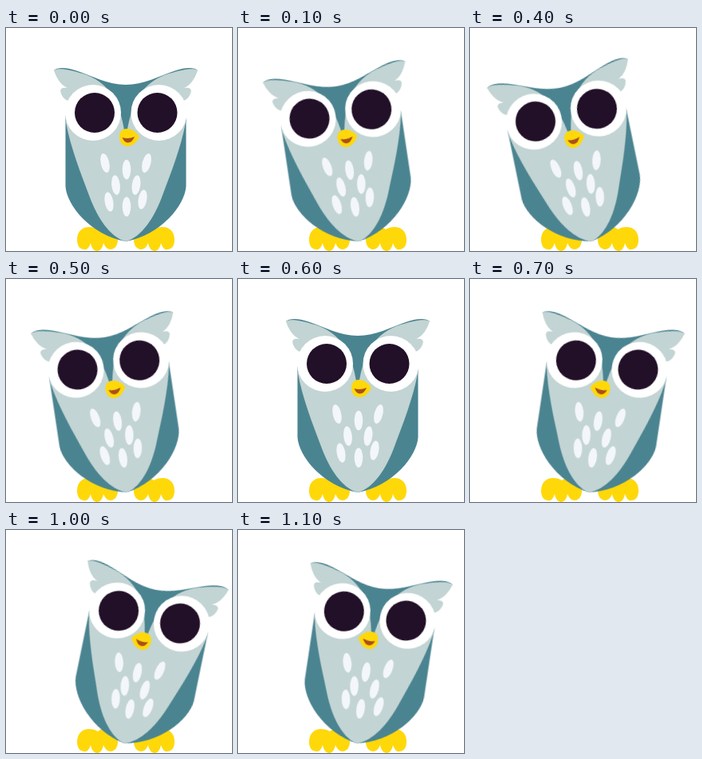
An HTML page without scripts for the animation above (1200 ms loop, 283 px wide and 279 px high).

```html
<!DOCTYPE html>
<html lang="en">
<head>
<meta charset="utf-8">
<title>Swaying owl</title>
<style>
  html, body { margin: 0; width: 100%; height: 100%; overflow: hidden; background: #fff; }
  svg { display: block; width: 283px; height: 279px; }
  .teal { fill: #4b8491; }
  .pale { fill: #c2d4d3; }
  .yellow { fill: #ffd80a; }
  .white { fill: #fff; }
  .pupil { fill: #220f28; }
  .feathers { fill: #f3f6fa; }
  .mouth { fill: #a9501c; }

  /* the second sway is the mirror image of the first */
  .scene {
    transform-origin: 150px 0;
    animation: mirror 1.2s step-end infinite;
  }
  @keyframes mirror {
    0%, 100% { transform: scaleX(1); }
    58.3333% { transform: scaleX(-1); }
  }

  /* six held poses, 100 ms each */
  .owl {
    transform-origin: 150px 254px;
    animation: sway .6s step-end infinite;
  }
  @keyframes sway {
    0%, 100% { transform: rotate(0deg); }
    16.6667%, 83.3333% { transform: rotate(-8.5deg); }
    33.3333%, 66.6667% { transform: rotate(-11.6deg); }
    50% { transform: rotate(-12.8deg); }
  }
</style>
</head>
<body>
<svg viewBox="0 0 283 279">
  <defs>
    <path id="foot" d="M89 265C89 255 95 249 104 249C109 249 112 250 115 252C118 249 123 248 128 250C136 252 140 258 140 265C140 272 136 277 131 277C127 277 124 274 122 269C121 275 118 279 114 279C110 279 107 275 106 269C104 275 101 278 98 277C92 277 89 272 89 265Z"/>
    <ellipse id="feather" rx="5.3" ry="12.3"/>
  </defs>

  <g class="scene">
    <g class="yellow">
      <use href="#foot"/>
      <use href="#foot" transform="translate(300) scale(-1 1)"/>
    </g>

    <g class="owl">
      <path class="teal" d="M60 53C64 49 75 49 87 53C108 60 128 71 150 71C172 71 192 60 213 53C225 49 236 49 240 53L205 75L225.500 110V198C224 222 194 259 150 267C106 259 76 222 74.500 198V110L95 75Z"/>
      <path class="pale" d="M60 53C65 49 80 52 96 57C128 67 145 92 150 142C155 92 172 67 204 57C220 52 235 49 240 53C237 62 232 71 223 75C231 74 233 77 231 82C229 87 226 90 222 91L225 118C219 150 207 180 195 212C186 236 170 262 150 267C130 262 114 236 105 212C93 180 81 150 75 118L78 91C74 90 71 87 69 82C67 77 69 74 77 75C68 71 63 62 60 53Z"/>

      <g class="white">
        <circle cx="109" cy="106" r="35"/>
        <circle cx="191.500" cy="106" r="35"/>
      </g>
      <g class="pupil">
        <circle cx="111" cy="106" r="25"/>
        <circle cx="189.500" cy="106" r="25"/>
      </g>

      <path class="yellow" d="M142 136C142 130 146 126 151 126C157 126 162 129 167 136C163 144 158 148 152 148C146 148 142 143 142 136Z"/>
      <path class="mouth" d="M145.500 137Q153 139.500 161 136Q158 143.500 152.500 143.500Q148 143 145.500 137Z"/>

      <g class="feathers">
        <use href="#feather" transform="translate(124 169) rotate(-12)"/>
        <use href="#feather" transform="translate(176 169) rotate(14)"/>
        <use href="#feather" transform="translate(151 177)"/>
        <use href="#feather" transform="translate(137.500 196.500) rotate(-6)"/>
        <use href="#feather" transform="translate(163 196.500) rotate(8)"/>
        <use href="#feather" transform="translate(129 217.500) rotate(-10)"/>
        <use href="#feather" transform="translate(151 223.500)"/>
        <use href="#feather" transform="translate(171 214.500) rotate(10)"/>
      </g>
    </g>
  </g>
</svg>
</body>
</html>
```
